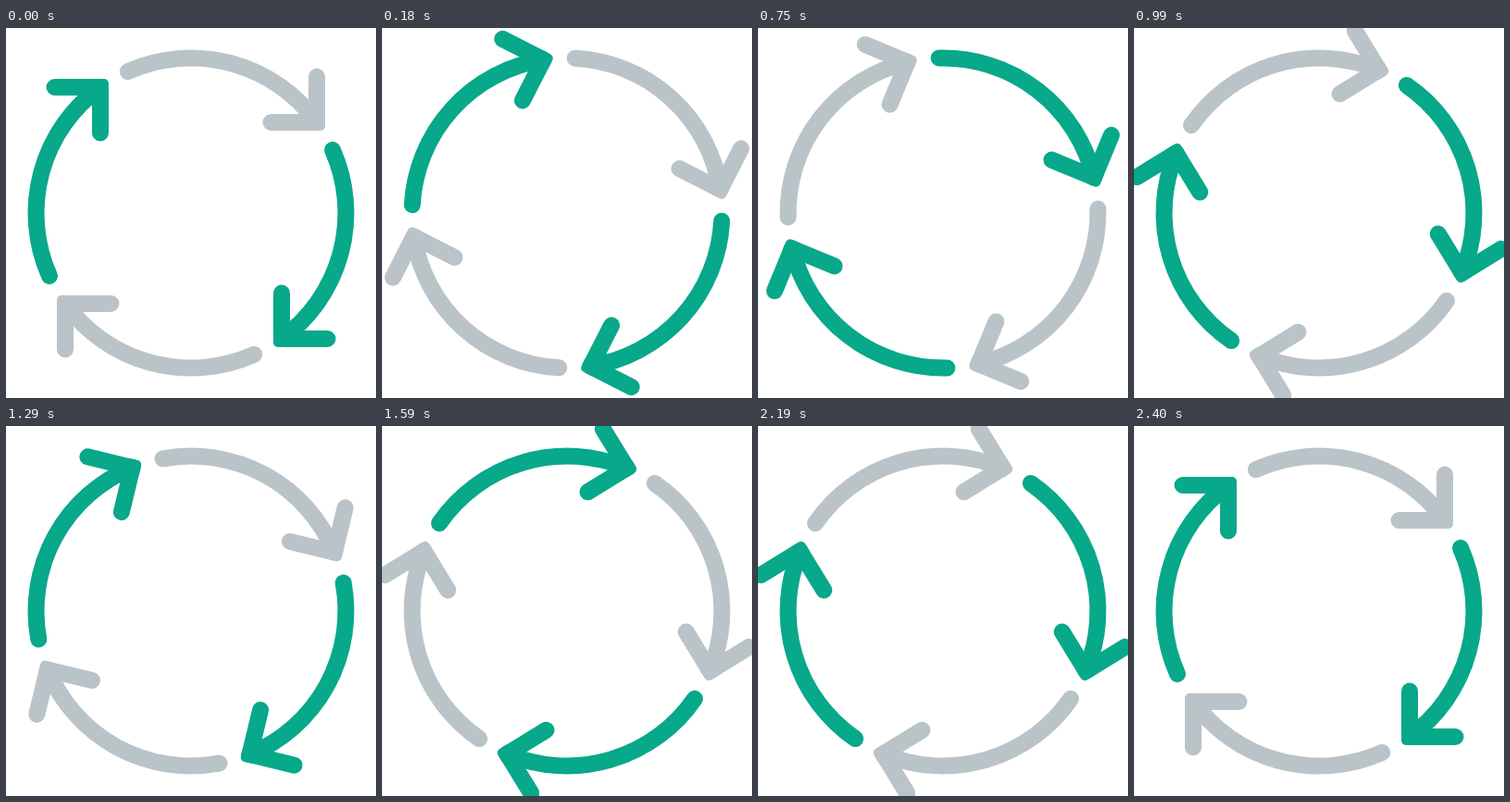
Write an HTML page with a canvas that moves like this. It is 400x400 px and loops after 2430 ms.

```html
<!DOCTYPE html>
<html lang="en">
<head>
<meta charset="utf-8">
<title>Circling arrows</title>
<style>
  html, body { margin: 0; width: 100%; height: 100%; overflow: hidden; background: #fff; }
  canvas { display: block; width: 100vmin; height: 100vmin; }
</style>
</head>
<body>
<canvas id="stage" width="400" height="400"></canvas>
<script>
const ctx = document.getElementById('stage').getContext('2d');
const LOOP = 2430, STEP = 30, DEGREES_PER_STEP = 4.5;
const GREEN = '#08a88a', GRAY = '#bac3c7';
const RADIUS = 167.5, WEIGHT = 18, ARM = 49.5, CORNER = 5;
const TIP = { x: -98, y: -136 };
const rad = degrees => degrees * Math.PI / 180;

function drawArrow(degrees, color) {
  ctx.save();
  ctx.rotate(rad(degrees));
  ctx.strokeStyle = ctx.fillStyle = color;

  ctx.beginPath();
  ctx.arc(0, 0, RADIUS, rad(156), Math.atan2(TIP.y, TIP.x));
  ctx.stroke();

  ctx.beginPath();
  ctx.moveTo(TIP.x - ARM, TIP.y);
  ctx.lineTo(TIP.x, TIP.y);
  ctx.lineTo(TIP.x, TIP.y + ARM);
  ctx.stroke();

  // Slightly squared outer corner of the head
  ctx.beginPath();
  ctx.roundRect(TIP.x - WEIGHT / 2, TIP.y - WEIGHT / 2, WEIGHT, WEIGHT, CORNER);
  ctx.fill();
  ctx.restore();
}

function draw(time) {
  const turn = Math.floor((time % LOOP) / STEP) * DEGREES_PER_STEP;
  ctx.fillStyle = '#fff';
  ctx.fillRect(0, 0, 400, 400);
  ctx.save();
  ctx.translate(200, 200);
  ctx.lineWidth = WEIGHT;
  ctx.lineCap = ctx.lineJoin = 'round';
  for (let i = 0; i < 4; i++) drawArrow(turn + i * 90, i % 2 ? GRAY : GREEN);
  ctx.restore();
}

let start;
function tick(now) {
  start ??= now;
  draw(Math.max(0, now - start));
  requestAnimationFrame(tick);
}
draw(0);
requestAnimationFrame(tick);
</script>
</body>
</html>
```
